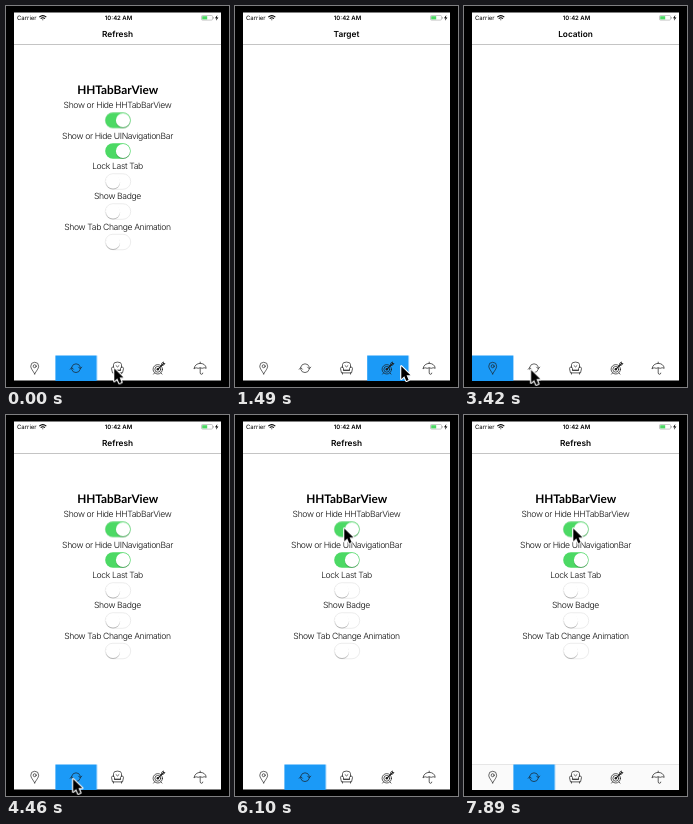
An HTML page that plays this animation: 223 by 381 pixels, repeating every 8000 ms.

```html
<!DOCTYPE html>
<html lang="en">
<head>
<meta charset="utf-8">
<title>Tab bar demo</title>
<style>
  html, body { margin: 0; width: 100%; height: 100%; overflow: hidden; background: #000; }
  svg { display: block; }
  text { font-family: Inter, "Open Sans", sans-serif; text-anchor: middle; text-rendering: geometricPrecision; }
  .status { font-size: 6px; }
  .title { font-size: 8.3px; font-weight: 600; }
  .heading { font: 700 11.8px Lato, sans-serif; }
  .label { font-size: 8.6px; font-weight: 300; letter-spacing: -.36px; fill: #111; }
  .icon { fill: none; stroke: #1c1c1c; stroke-width: .7; stroke-linejoin: round; stroke-linecap: round; }
  .solid { fill: #1c1c1c; stroke: none; }
  .track { fill: #fff; stroke: #e8e8e8; stroke-width: .8; }
  .green { fill: #4cd964; }
  .knob { fill: #fff; filter: drop-shadow(0 1.1px .7px rgba(0, 0, 0, .25)); }

  #cursor, #titles, #mark, #page, #bar, #base, #knob, #green { animation: 8s step-end infinite; }
  #cursor { animation-name: cursor; }
  #titles { animation-name: titles; }
  #mark { animation-name: mark; }
  #page { animation-name: page; }
  #bar { animation-name: bar; }
  #base { animation-name: base; }
  #knob { animation-name: knob; }
  #green { animation-name: green; }

  /* 1% = 80 ms */
  @keyframes mark {
    0% { transform: translateX(41.4px); }
    3.75% { transform: translateX(82.8px); }
    13.125% { transform: translateX(124.2px); }
    24.25% { transform: translateX(165.6px); }
    37.25% { transform: translateX(0); }
    53.875%, 100% { transform: translateX(41.4px); }
  }
  @keyframes titles {
    0% { transform: translateY(-30px); }
    3.75% { transform: translateY(-60px); }
    13.125% { transform: translateY(-90px); }
    24.25% { transform: translateY(-120px); }
    37.25% { transform: translateY(0); }
    53.875%, 100% { transform: translateY(-30px); }
  }
  @keyframes page {
    0% { visibility: visible; }
    3.75% { visibility: hidden; }
    53.875%, 100% { visibility: visible; }
  }
  @keyframes cursor {
    0% { transform: translate(108px, 361.3px); }
    7.5% { transform: translate(124px, 361px); }
    9.375% { transform: translate(144px, 359.6px); }
    15% { transform: translate(150px, 359.5px); }
    16.875% { transform: translate(166px, 359px); }
    18.75% { transform: translate(180px, 358.5px); }
    20.5% { transform: translate(187px, 358.5px); }
    22.375% { transform: translate(189px, 358.5px); }
    28% { transform: translate(158px, 363px); }
    29.875% { transform: translate(104px, 366.4px); }
    31.75% { transform: translate(58px, 366px); }
    33.625% { transform: translate(33px, 364px); }
    35.375% { transform: translate(28px, 363px); }
    39.125% { transform: translate(35px, 363.5px); }
    40.875% { transform: translate(51px, 364px); }
    42.75% { transform: translate(66.8px, 362.8px); }
    61.375% { transform: translate(80px, 300px); }
    63.25% { transform: translate(105px, 176px); }
    65.125% { transform: translate(117px, 104px); }
    68.875% { transform: translate(117px, 110px); }
    70.75% { transform: translate(116px, 115px); }
    72.5% { transform: translate(113px, 115px); }
    74.375% { transform: translate(110px, 113px); }
    76.25%, 100% { transform: translate(109px, 112.3px); }
  }
  @keyframes bar {
    0% { transform: translateY(0); }
    83.75% { transform: translateY(2px); }
    85.625% { transform: translateY(12px); }
    87.5% { transform: translateY(23px); }
    89.25% { transform: translateY(26px); }
    94.875% { transform: translateY(22px); }
    96.75% { transform: translateY(8px); }
    98.625%, 100% { transform: translateY(0); }
  }
  @keyframes base {
    0% { visibility: hidden; }
    83.75%, 100% { visibility: visible; }
  }
  @keyframes knob {
    0% { transform: translateX(0); }
    83.75% { transform: translateX(-3px); }
    85.625% { transform: translateX(-9px); }
    87.5% { transform: translateX(-10px); }
    94.875% { transform: translateX(-7px); }
    96.75%, 100% { transform: translateX(0); }
  }
  @keyframes green {
    0% { opacity: 1; }
    83.75% { opacity: .85; }
    85.625% { opacity: .25; }
    87.5% { opacity: 0; }
    94.875% { opacity: .25; }
    96.75%, 100% { opacity: 1; }
  }
</style>
</head>
<body>
<svg width="223" height="381" viewBox="0 0 223 381">
  <defs>
    <clipPath id="screen"><rect x="8" y="6.5" width="207" height="368"/></clipPath>
    <rect id="pill" x="99.2" y="-7.75" width="25.5" height="15.5" rx="7.75"/>
    <g id="off">
      <use href="#pill" class="track"/>
      <circle class="knob" cx="107" r="7.1"/>
    </g>
  </defs>

  <g clip-path="url(#screen)">
    <rect x="8" y="6" width="207" height="369" fill="#fff"/>
    <rect x="8" y="38" width="207" height="1" fill="#c4c4c4"/>

    <g class="status">
      <text x="20.8" y="14">Carrier</text>
      <text x="112.5" y="14" font-weight="600">10:42 AM</text>
    </g>
    <g fill="none" stroke="#000" stroke-width="1.1">
      <path d="M33.3 11.2Q36.8 8 40.3 11.2M34.7 12.7Q36.8 10.8 38.9 12.7"/>
      <circle cx="36.8" cy="13.8" r=".5" fill="#000" stroke="none"/>
    </g>
    <rect x="195.5" y="9.5" width="11" height="4.6" rx="1" fill="#fff" stroke="#a5a5a5" stroke-width=".6"/>
    <rect x="196.2" y="10.2" width="5" height="3.2" fill="#4cd964"/>
    <rect x="207.1" y="11" width=".7" height="1.7" fill="#a5a5a5"/>
    <path d="M211.4 9L209 12.2H210.6L210 14.8L212.4 11.4H210.8Z"/>

    <svg x="60" y="20" width="103" height="17">
      <g id="titles" class="title">
        <text x="51.5" y="11">Location</text>
        <text x="51.5" y="41">Refresh</text>
        <text x="51.5" y="71">Sofa</text>
        <text x="51.5" y="101">Target</text>
        <text x="51.5" y="131">Umbrella</text>
      </g>
    </svg>

    <g id="page">
      <text class="heading" x="111.7" y="87.9">HHTabBarView</text>
      <g class="label">
        <text x="111.5" y="102.3">Show or Hide HHTabBarView</text>
        <text x="111.5" y="132.8">Show or Hide UINavigationBar</text>
        <text x="111.5" y="163.3">Lock Last Tab</text>
        <text x="111.5" y="193.3">Show Badge</text>
        <text x="111.5" y="223.8">Show Tab Change Animation</text>
      </g>
      <g transform="translate(0 114.3)">
        <use href="#pill" class="track"/>
        <use href="#pill" class="green" id="green"/>
        <circle id="knob" class="knob" cx="117" r="7.1"/>
      </g>
      <g transform="translate(0 145)">
        <use href="#pill" class="green"/>
        <circle class="knob" cx="117" r="7.1"/>
      </g>
      <use href="#off" y="175.5"/>
      <use href="#off" y="205.5"/>
      <use href="#off" y="236"/>
    </g>

    <g id="base">
      <rect x="8" y="349.5" width="207" height="25.5" fill="#fafafa"/>
      <rect x="8" y="349" width="207" height="1" fill="#e6e6e6"/>
    </g>
    <g id="bar">
      <rect id="mark" x="8" y="349.5" width="41.4" height="25.5" fill="#1b9af7"/>
      <g class="icon">
        <!-- pin -->
        <g transform="translate(28.7 362.1) scale(.94)">
          <path d="M0 6.2C-1.6 3-4.2.6-4.2-2A4.2 4.2 0 0 1 4.2-2C4.2.6 1.6 3 0 6.2Z"/>
          <circle cy="-2" r="1.6"/>
        </g>
        <!-- refresh -->
        <g transform="translate(70 362.1) scale(.96)">
          <path d="M-4.4-1.2A4.6 4.6 0 0 1 4.4-1.2V.2M4.4 1.4A4.6 4.6 0 0 1-4.4 1.4V-.2"/>
          <path d="M2.7-1L4.5.8L6-1M-6 1.2L-4.5-.6L-2.7 1.2"/>
        </g>
        <!-- sofa -->
        <g transform="translate(111.5 362.1)">
          <path d="M-4-.8V-3.6Q-4-6 0-6T4-3.6V-.8M-3 2V.4Q-3.2-1.2-4.6-1.1T-6 .6L-5 4.8H5L6 .6Q6-1 4.6-1.1T3 .4V2ZM-3 2H3M-4 4.8V6M4 4.8V6"/>
          <path d="M-1.4-2.4L0-1.2L1.4-2.4"/>
        </g>
        <!-- target -->
        <g transform="translate(152.8 362.1)">
          <circle cx="-1" cy="1.2" r="4.7"/>
          <circle cx="-1" cy="1.2" r="2.9"/>
          <circle cx="-1" cy="1.2" r="1.2" class="solid"/>
          <path stroke-width="1.2" d="M-1 1.2L5-4.8"/>
          <path d="M2.4-2.6L3-5L4.6-6.2V-4.6L6.2-4.6L5-3L2.4-2.4M-4.2 4.8L-5.2 6M2.2 4.8L3.2 6"/>
        </g>
        <!-- umbrella -->
        <g transform="translate(194.2 362.1)">
          <path d="M-6 .2C-5.6-6.4 5.6-6.4 6 .2Q4-.9 2 .2Q0-.9-2 .2Q-4-.9-6 .2ZM0-4.8V-6M0 0V4.8Q.1 6.2 1.3 6.2T2.6 5"/>
        </g>
      </g>
    </g>
  </g>

  <g id="cursor">
    <path transform="translate(.3 1.3)" d="M0 0V12.6L3 9.9L5 14.6L7.3 13.6L5.3 9H9.2Z" stroke="#fff" stroke-width="2.3" stroke-linejoin="round" paint-order="stroke"/>
  </g>
</svg>
</body>
</html>
```
